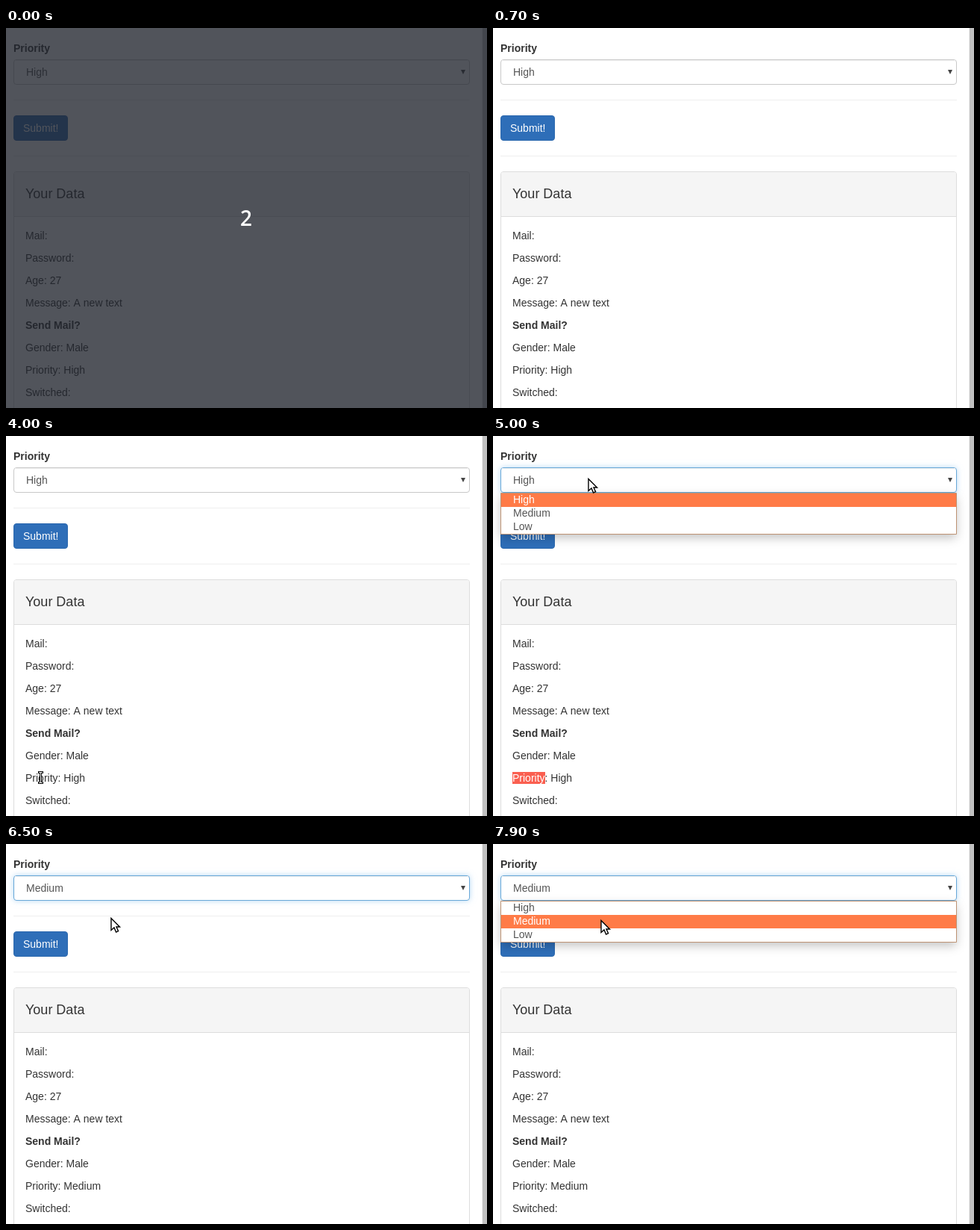
Write an HTML page with a canvas that moves like this. It is 645 px wide and 509 px high and loops after 8000 ms.

```html
<!DOCTYPE html>
<html lang="en">
<head>
<meta charset="utf-8">
<title>Priority form</title>
<style>
  html, body { margin: 0; width: 100%; height: 100%; overflow: hidden; background: #fff; }
  canvas { display: block; }
</style>
</head>
<body>
<canvas id="stage" width="645" height="509"></canvas>
<script>
const ctx = document.getElementById('stage').getContext('2d');
const LOOP = 8000;
const STEP = 100;
const SANS = '"Liberation Sans", Arial, sans-serif';
const BODY = '14px ' + SANS;
const BOLD = 'bold 14px ' + SANS;
const OPTIONS = ['High', 'Medium', 'Low'];
const ROW = 18;
const LINE = 30;

// Each move glides from the previous point in even steps
const move = (start, steps, x, y) => ({ start, steps, x, y });
const MOVES = [
  move(900, 2, 139, 48),
  move(1200, 3, 152, 243),
  move(1600, 4, 98, 475),
  move(2100, 1, 108, 457),
  move(2400, 4, 27, 457),
  move(2800, 2, 102, 457),
  move(3500, 1, 15, 456),
  move(3600, 1, 11, 422),
  move(4000, 1, 46, 457),
  move(4300, 2, 148, 250),
  move(4500, 1, 134, 122),
  move(4700, 1, 124, 68),
  move(4900, 1, 127, 57),
  move(5200, 1, 132, 95),
  move(5500, 1, 140, 99),
  move(6900, 4, 139, 65),
  move(7400, 1, 138, 58),
  move(7800, 2, 144, 102)
];

const within = (t, from, to) => t >= from && t < to;

function pointerAt(t) {
  let x = 136, y = 2;
  for (const m of MOVES) {
    const done = Math.floor((t - m.start) / STEP) + 1;
    if (done <= 0) break;
    const part = Math.min(1, done / m.steps);
    x += (m.x - x) * part;
    y += (m.y - y) * part;
  }
  return [Math.round(x), Math.round(y)];
}

function rect(x, y, w, h, color) {
  ctx.fillStyle = color;
  ctx.fillRect(x, y, w, h);
}

function text(str, x, y, color = '#333', font = BODY) {
  ctx.font = font;
  ctx.fillStyle = color;
  ctx.fillText(str, x, y);
}

function box(x, y, w, h, r, fill, border) {
  ctx.beginPath();
  ctx.roundRect(x + 0.5, y + 0.5, w - 1, h - 1, r);
  ctx.fillStyle = fill;
  ctx.fill();
  ctx.strokeStyle = border;
  ctx.lineWidth = 1;
  ctx.stroke();
}

function shadowBox(x, y, w, h, color, blur, dy) {
  ctx.save();
  ctx.shadowColor = color;
  ctx.shadowBlur = blur;
  ctx.shadowOffsetY = dy;
  rect(x, y, w, h, '#fff');
  ctx.restore();
}

function polygon(...points) {
  ctx.beginPath();
  points.forEach(([x, y]) => ctx.lineTo(x, y));
  ctx.closePath();
}

function drawSelect(value, focused) {
  if (focused) shadowBox(11, 43, 610, 32, 'rgba(102,175,233,0.6)', 8, 0);
  box(10, 42, 612, 34, 3.5, '#fff', focused ? '#68a8d8' : '#c8c8c8');
  rect(12, 43, 608, 1, '#efefef');
  text(value, 27, 64, '#555');
  polygon([610, 56], [616, 56], [613, 62]);
  ctx.fillStyle = '#444';
  ctx.fill();
}

function drawList(active) {
  shadowBox(11, 77, 610, 54, 'rgba(0,0,0,0.25)', 13, 5);
  box(10, 76, 612, 56, 0, '#fff', '#bd9273');
  OPTIONS.forEach((name, i) => {
    const on = i === active;
    if (on) rect(11, 77 + i * ROW, 610, ROW, '#ff7b47');
    text(name, 27, 90 + i * ROW, on ? '#fff' : '#555');
  });
}

function drawSelection(line, part) {
  ctx.font = BODY;
  const width = Math.round(ctx.measureText(part).width);
  ctx.save();
  ctx.beginPath();
  ctx.rect(26, 450, width, 16);
  ctx.clip();
  rect(26, 450, width, 16, '#fa5f50');
  text(line, 26, 463, '#fff');
  ctx.restore();
}

function drawPanel(value, t) {
  box(10, 192, 612, 330, 3.5, '#fff', '#ddd');
  ctx.beginPath();
  ctx.roundRect(11, 193, 610, 59, [3, 3, 0, 0]);
  ctx.fillStyle = '#f5f5f5';
  ctx.fill();
  rect(11, 252, 610, 1, '#ddd');
  text('Your Data', 26, 228, '#333', '18px ' + SANS);

  const priority = 'Priority: ' + value;
  const lines = ['Mail:', 'Password:', 'Age: 27', 'Message: A new text',
    'Send Mail?', 'Gender: Male', priority, 'Switched:'];
  lines.forEach((line, i) =>
    text(line, 26, 283 + i * LINE, '#333', line.endsWith('?') ? BOLD : BODY));

  if (within(t, 3500, 4000)) drawSelection(priority, priority);
  if (within(t, 4200, 6500)) drawSelection(priority, 'Priority');
}

function drawArrow(x, y) {
  ctx.save();
  ctx.translate(x + 1, y + 0.5);
  polygon([0, 0], [0, 16], [4, 12.5], [6.6, 18.5], [9.6, 17.2], [7, 11.5], [11.5, 11.5]);
  ctx.fillStyle = '#fff';
  ctx.fill();
  ctx.strokeStyle = '#000';
  ctx.lineWidth = 1.4;
  ctx.stroke();
  ctx.restore();
}

function drawBeam(x, y) {
  for (const [color, grow] of [['#000', 1], ['#fff', 0]]) {
    const bar = (dx, dy, w, h) =>
      rect(x + dx - grow, y + dy - grow, w + 2 * grow, h + 2 * grow, color);
    bar(-2, -7, 5, 1);
    bar(0, -7, 1, 15);
    bar(-2, 7, 5, 1);
  }
}

function drawPointer(t) {
  const [x, y] = pointerAt(t);
  const overText = within(x, 26, 106) && within(y, 450, 466);
  (overText ? drawBeam : drawArrow)(x, y);
}

function drawCountdown(digit) {
  rect(0, 0, 645, 509, 'rgba(32,37,45,0.78)');
  ctx.textAlign = 'center';
  text(digit, 322, 265, '#fff', '600 28px "Open Sans", sans-serif');
  ctx.textAlign = 'left';
}

function draw(t) {
  const value = OPTIONS[t < 6500 ? 0 : 1];
  rect(0, 0, 645, 509, '#fff');
  rect(638, 0, 1, 509, '#f1f1f1');
  rect(639, 0, 6, 509, '#c1c1c1');
  text('Priority', 10, 32, '#333', BOLD);
  rect(10, 96, 612, 1, '#eee');
  rect(10, 171, 612, 1, '#eee');
  box(10, 117, 73, 34, 3.5, '#2e6eb8', '#2b68ae');
  text('Submit!', 23, 139, '#fff');
  drawPanel(value, t);
  drawSelect(value, t >= 4900);
  if (within(t, 5000, 6500)) drawList(t < 5200 ? 0 : 1);
  if (t >= 7700) drawList(1);
  if (t >= 900) drawPointer(t);
  if (t < 700) drawCountdown(t < 400 ? '2' : '1');
}

function tick() {
  draw(performance.now() % LOOP);
  requestAnimationFrame(tick);
}
tick();
</script>
</body>
</html>
```
